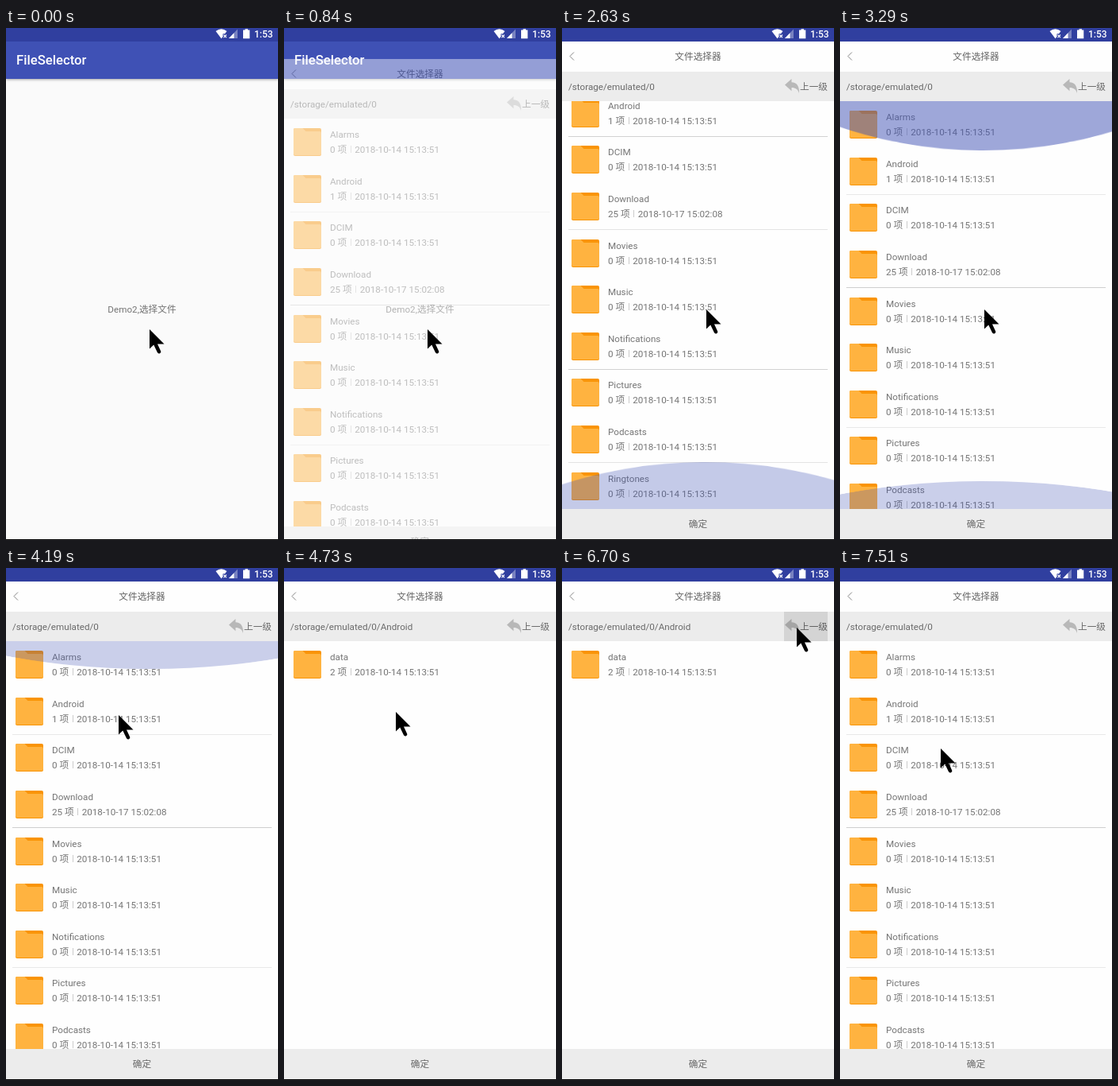
These frames come from a looping animation (343 by 644 pixels, 8000 ms). An HTML page:

```html
<!DOCTYPE html>
<html lang="zh-CN">
<head>
<meta charset="utf-8">
<title>File selector demo</title>
<style>
html, body { margin: 0; width: 100%; height: 100%; overflow: hidden; background: #fafafa; }
body {
  position: relative;
  font: 11.68px/20px Roboto, "Noto Sans CJK SC", "Noto Sans CJK", sans-serif;
  color: #757575;
  white-space: nowrap;
}
body *, svg { position: absolute; }
span, i, b { position: static !important; font: inherit; }
.anim { animation: 8s step-end infinite; }

#status { left: 0; top: 0; width: 343px; height: 17px; background: #303f9f; }
#clock { left: 313px; top: -2px; font-weight: 500; font-size: 12px; color: #fff; }
#bar {
  left: 0; top: 17px; width: 343px; height: 47px; background: #3f51b5;
  box-shadow: 0 1px 3px rgba(0, 0, 0, .35);
}
#bar div { left: 13px; top: 14px; font-size: 16.7px; font-weight: 500; color: #fff; }
.mid { left: 0; width: 343px; text-align: center; }
#edge { left: 0; top: 643px; width: 343px; height: 1px; background: #000; }

#screen { left: 0; top: 17px; width: 343px; height: 627px; overflow: hidden; }
#page { left: 0; top: 0; width: 343px; height: 627px; background: #fefefe; animation-name: open; }
#path, #ok { left: 0; width: 343px; background: #ececec; color: #6a6a6a; }
#path { top: 38px; height: 37px; }
#path > div { top: 9px; }
#ok { top: 588px; height: 39px; line-height: 39px; text-align: center; }
#sub { animation-name: inside; }
#press { left: 280px; top: 0 !important; width: 55px; height: 37px; background: #000; animation-name: press; }
#view { left: 0; top: 75px; width: 343px; height: 513px; overflow: hidden; }
#root { inset: 0; animation-name: outside; }
#list { left: 0; top: 0; animation-name: scroll; }
#child { left: 0; top: 0; animation-name: inside; }
.row { left: 0; width: 343px; height: 58px; }
.row svg { left: 12px; top: 12px; }
.name { left: 58px; top: 10px; }
.info { left: 58px; top: 29px; }
.info i { display: inline-block; width: 1px; height: 9px; margin: 0 4.5px; background: #ccc; }
.line { left: 8px; width: 327px; height: 1px; }

.glow {
  left: -334.5px; width: 1029px; height: 1029px;
  border-radius: 50%; background: #3f51b5;
}
#top { top: -960px; transform-origin: 50% 960px; animation-name: top; }
#bottom { top: 444px; transform-origin: 50% 69px; animation-name: bottom; }
#cursor { left: 0; top: 0; animation-name: cursor; }

@keyframes open {
  0% { opacity: 0; transform: translateY(50px); }
  10.5% { opacity: .45; transform: translateY(22px); }
  12% { opacity: 1; transform: translateY(4px); }
  13.5%, 100% { opacity: 1; transform: none; }
}
@keyframes scroll {
  0%, 39.625%, 100% { transform: none; --a: #e9e9e9; --b: #cfcfcf; }
  32.875% { transform: translateY(-73px); --a: #d2d2d2; --b: #e4e4e4; }
}
@keyframes bottom {
  0% { opacity: 0; transform: scaleY(.1); }
  32.875% { opacity: .3; transform: scaleY(.856); }
  34.375% { opacity: .3; transform: scaleY(.885); }
  36.25% { opacity: .3; transform: scaleY(.914); }
  37.75% { opacity: .3; transform: scaleY(.93); }
  39.625% { opacity: .3; transform: scaleY(.75); }
  41.125% { opacity: .27; transform: scaleY(.508); }
  42.625% { opacity: .2; transform: scaleY(.26); }
  44.125%, 100% { opacity: 0; transform: scaleY(.1); }
}
@keyframes top {
  0% { opacity: 0; transform: scaleY(.1); }
  39.625% { opacity: .42; transform: scaleY(.72); }
  41.125% { opacity: .5; transform: scaleY(.9); }
  42.625% { opacity: .42; transform: scaleY(.89); }
  44.125% { opacity: .3; transform: scaleY(.87); }
  47.125% { opacity: .27; transform: scaleY(.81); }
  49% { opacity: .27; transform: scaleY(.65); }
  50.875% { opacity: .27; transform: scaleY(.58); }
  52.375% { opacity: .27; transform: scaleY(.508); }
  53.875% { opacity: .27; transform: scaleY(.42); }
  55.375% { opacity: .27; transform: scaleY(.335); }
  57.25% { opacity: .27; transform: scaleY(.26); }
  59.125%, 100% { opacity: 0; transform: scaleY(.1); }
}
@keyframes inside {
  0%, 85.625%, 100% { visibility: hidden; }
  59.125% { visibility: visible; }
}
@keyframes outside {
  0%, 85.625%, 100% { visibility: visible; }
  59.125% { visibility: hidden; }
}
@keyframes press {
  0%, 87.25%, 100% { opacity: 0; }
  83.75% { opacity: .1; }
  85.625% { opacity: .05; }
}
@keyframes cursor {
  0% { transform: translate(181px, 379px); }
  22.125% { transform: translate(182px, 380px); }
  31% { transform: translate(182px, 354px); }
  47.125% { transform: translate(170px, 274px); }
  49% { transform: translate(159px, 241px); }
  50.875% { transform: translate(149px, 208px); }
  52.375% { transform: translate(142px, 185px); }
  53.875% { transform: translate(141px, 181px); }
  75% { transform: translate(225px, 122px); }
  76.5% { transform: translate(262px, 108px); }
  78.375% { transform: translate(314px, 67px); }
  79.875% { transform: translate(296px, 75px); }
  89% { transform: translate(220px, 122px); }
  90.5% { transform: translate(153px, 175px); }
  92.375% { transform: translate(134px, 207px); }
  93.875%, 100% { transform: translate(127px, 227px); }
}
</style>
</head>
<body>
<div id="bar"><div>FileSelector</div></div>
<div class="mid" style="top:344px">Demo2,选择文件</div>

<div id="screen">
  <div id="page" class="anim">
    <svg width="20" height="38" fill="none" stroke="#858585"><path d="M15 13.5 10 18.5 15 23.5"/></svg>
    <div class="mid" style="top:9px;color:#666">文件选择器</div>
    <div id="path">
      <div style="left:8px">/storage/emulated/0<span id="sub" class="anim">/Android</span></div>
      <svg style="left:281px;top:9px" width="19" height="19" fill="#b8b8b8">
        <path d="M0 7.5 8.5 0V4.3C15 4.5 18.5 9 18 18 16.5 13 13.5 11 8.5 11V15.2Z"/>
      </svg>
      <div style="left:300px">上一级</div>
      <div id="press" class="anim"></div>
    </div>
    <div id="view">
      <div id="root"  class="anim"><div id="list" class="anim"></div></div>
      <div id="child" class="anim"></div>
      <div id="top" class="glow anim"></div>
      <div id="bottom" class="glow anim"></div>
    </div>
    <div id="ok">确定</div>
  </div>
</div>

<div id="status">
  <svg width="343" height="17" fill="#fff">
    <path d="M264.5 4Q271.5-1.5 278.5 4L276 7.2H273.5V11L271.5 13.2Z"/>
    <path d="M274.5 8.5 278 12.2M278 8.5 274.5 12.2" stroke="#fff" stroke-width="1.1"/>
    <path d="M281 13H292V1.5Z" opacity=".35"/>
    <path d="M281 13H287.5V6.2Z"/>
    <path d="M299 2.5H301.5V1.2H305V2.5H307.3V13.2H299Z"/>
  </svg>
  <div id="clock">1:53</div>
</div>
<div id="edge"></div>
<svg id="cursor" class="anim" width="20" height="32"><path d="M0 0V24.5L5.3 19.5 10 29.3Q11 31 13 30.2 15 29 14.2 27.4L10 18.5H18.5Z"/></svg>

<script>
const PITCH = 58.625;
const NAMES = ["Alarms", "Android", "DCIM", "Download", "Movies", "Music",
  "Notifications", "Pictures", "Podcasts", "Ringtones"];
const COUNTS = { Android: 1, Download: 25, data: 2 };
const FOLDER = `<svg width="35" height="35">
  <rect width="35" height="35" rx="2" fill="#f99406"/>
  <path d="M0 2Q0 0 2 0H11.5L15.5 4H33Q35 4 35 6V32Q35 34 33 34H2Q0 34 0 32Z" fill="#ffb340"/></svg>`;

function row(name, i) {
  const date = name === "Download" ? "2018-10-17 15:02:08" : "2018-10-14 15:13:51";
  return `<div class="row" style="top:${Math.round(PITCH * i)}px">${FOLDER}
    <div class="name">${name}</div>
    <div class="info">${COUNTS[name] || 0} 项<i></i>${date}</div></div>`;
}

// Only some hairlines survive the scaled-down screen.
function line(i, k) {
  const shade = k % 2 ? "--b" : "--a";
  return `<div class="line" style="top:${Math.floor(PITCH * i)}px;background:var(${shade})"></div>`;
}

document.getElementById("list").innerHTML =
  NAMES.map(row).join("") + [2, 4, 7, 9].map(line).join("");
document.getElementById("child").innerHTML = row("data", 0);
</script>
</body>
</html>
```
